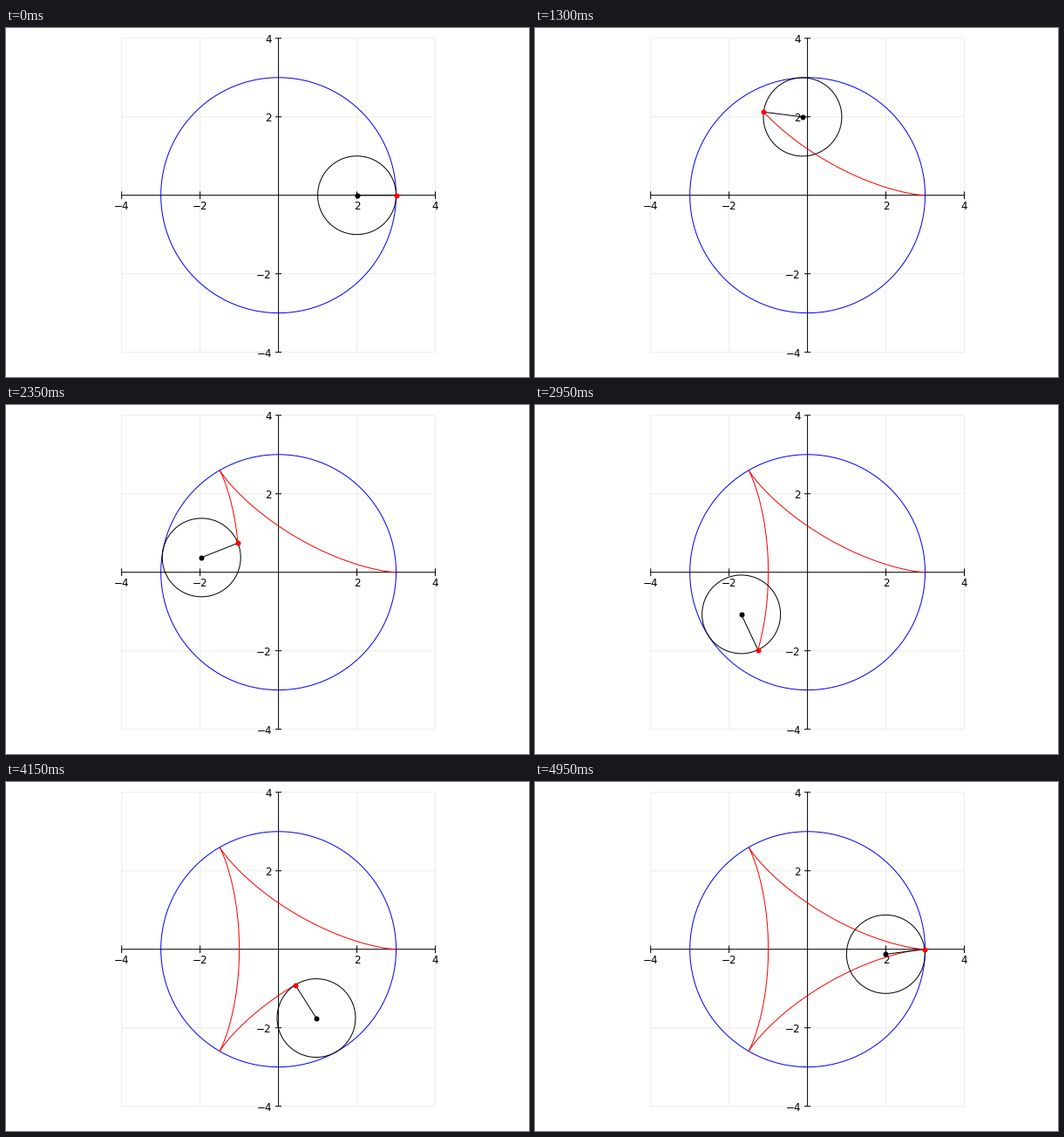
Write a matplotlib script that moves like this. It is 600 px wide and 400 px high and loops after 5 s.

```python
import numpy as np
import matplotlib.pyplot as plt
from matplotlib.animation import FuncAnimation

FRAMES, INTERVAL = 100, 50
X0, Y0, UNIT = 312.6, 191.7, 44.98   # origin and scale in pixels
PX = 0.72                            # one pixel in points at 100 dpi
BIG, SMALL = 3, 1

plt.rcParams["font.family"] = "DejaVu Sans"
fig = plt.figure(figsize=(6, 4), dpi=100, facecolor="white")
ax = fig.add_axes([0, 0, 1, 1])
ax.set_xlim(0, 600)
ax.set_ylim(400, 0)
ax.axis("off")


def to_px(x, y):
    return X0 + UNIT * np.asarray(x), Y0 - UNIT * np.asarray(y)


def line(xs, ys, color, width=1.0, z=2):
    return ax.plot(xs, ys, color=color, lw=width * PX, zorder=z,
                   snap=False, solid_capstyle="butt")[0]


def dot(color, z):
    return ax.plot([], [], "o", color=color, ms=6 * PX, mew=0, zorder=z)[0]


def label(x, y, value, ha):
    text = str(value).replace("-", "\u2212")
    ax.text(x, y, text, size=12 * PX, ha=ha, va="center_baseline", zorder=2)


def circle(cx, cy, r):
    a = np.linspace(0, 2 * np.pi, 241)
    return to_px(cx + r * np.cos(a), cy + r * np.sin(a))


def roulette(t):
    d = BIG - SMALL
    k = d / SMALL
    return (d * np.cos(t) + SMALL * np.cos(k * t),
            d * np.sin(t) - SMALL * np.sin(k * t))


# Grid, axes and ticks
left, top = to_px(-4, 4)
right, bottom = to_px(4, -4)
for v in (-4, -2, 0, 2, 4):
    gx, gy = to_px(v, v)
    line([gx, gx], [top, bottom], "#ececec", z=1)
    line([left, right], [gy, gy], "#ececec", z=1)
    if v:
        line([gx, gx], [Y0 - 4.3, Y0 + 4.3], "black")
        line([X0 - 3.5, X0 + 3.5], [gy, gy], "black")
        label(gx, 203.3, v, "center")
        label(304.8, gy, v, "right")
line([left, right], [Y0, Y0], "black")
line([X0, X0], [top, bottom], "black")

line(*circle(0, 0, BIG), "blue", z=3)
trace = line([], [], "red", z=4)
wheel = line([], [], "black", z=5)
arm = line([], [], "black", z=6)
hub = dot("black", 7)
pen = dot("red", 8)


def update(i):
    t = 2 * np.pi * i / FRAMES
    cx, cy = (BIG - SMALL) * np.cos(t), (BIG - SMALL) * np.sin(t)
    px, py = roulette(t)
    trace.set_data(*to_px(*roulette(np.linspace(0, t, 4 * i + 1))))
    wheel.set_data(*circle(cx, cy, SMALL))
    arm.set_data(*to_px([cx, px], [cy, py]))
    hub.set_data(*to_px([cx], [cy]))
    pen.set_data(*to_px([px], [py]))
    return trace, wheel, arm, hub, pen


anim = FuncAnimation(fig, update, frames=FRAMES, interval=INTERVAL,
                     init_func=lambda: update(0), repeat=True, repeat_delay=0)
plt.show()
```
